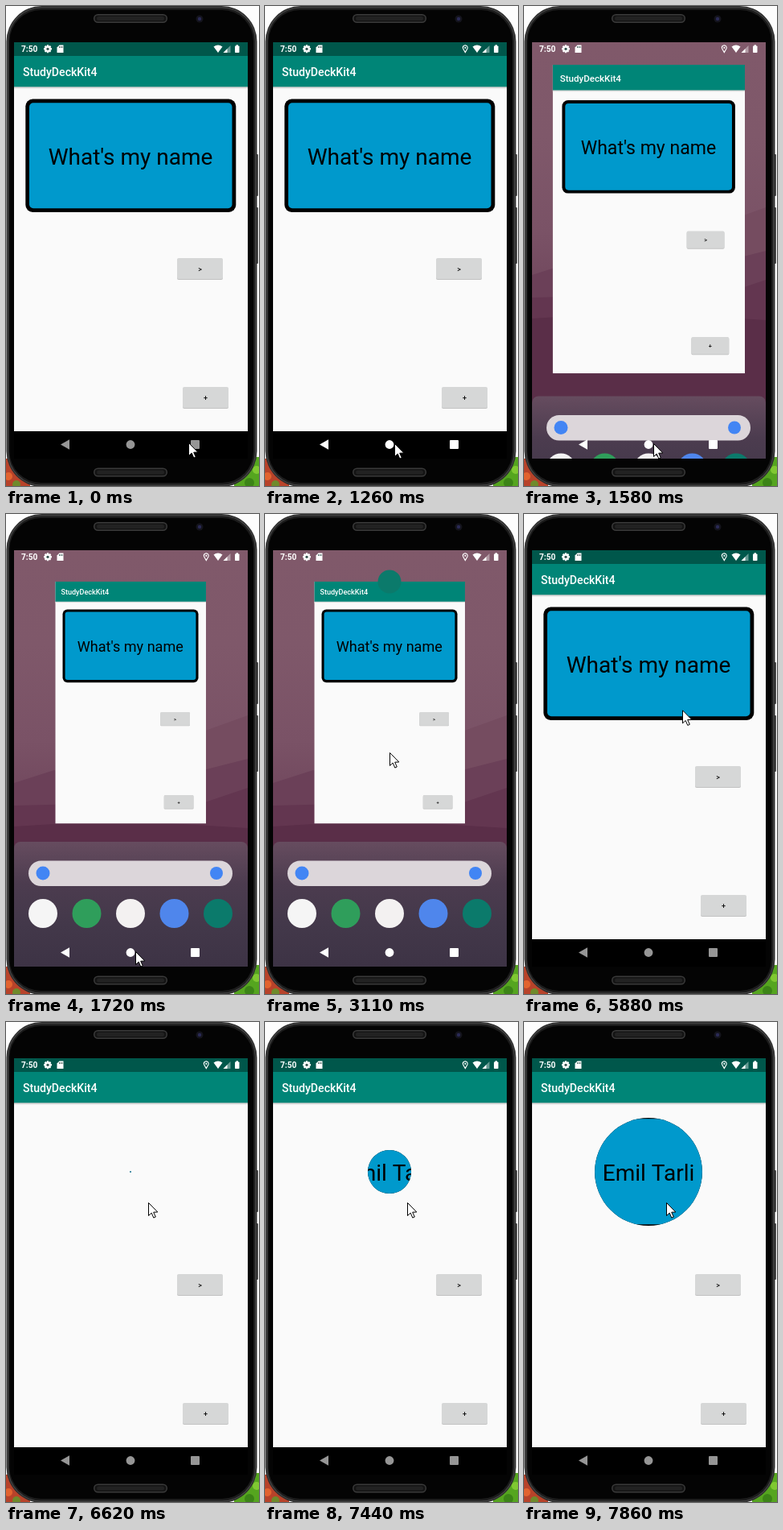
Recreate the animation shown at these times as an HTML page with a canvas. Size 315x596 px, loop 7990 ms.

```html
<!DOCTYPE html>
<html lang="en">
<head>
<meta charset="utf-8">
<title>Flash card demo</title>
<style>
  html, body { margin: 0; width: 100%; height: 100%; overflow: hidden; background: #fdfdfd; }
  canvas { display: block; width: 315px; height: 596px; }
</style>
</head>
<body>
<canvas id="stage" width="315" height="596"></canvas>
<script>
const ctx = document.getElementById('stage').getContext('2d');
const LOOP = 7990;
const TITLE = 'StudyDeckKit4', QUESTION = "What's my name", ANSWER = 'Emil Tarli';
const BLUE = '#0099cc', PAPER = '#fafafa', TEAL = '#008577';

const lerp = (a, b, p) => a + (b - a) * p;
const clamp = v => Math.max(0, Math.min(1, v));

// Number of steps taken at time t when n steps fall evenly from a to b.
function stepsDone(t, a, b, n) {
  if (t < a) return 0;
  return Math.min(n, 1 + Math.floor((t - a) / (b - a) * (n - 1) + 1e-6));
}

function box(x, y, w, h, r, fill) {
  ctx.beginPath();
  ctx.roundRect(x, y, w, h, r);
  ctx.fillStyle = fill;
  ctx.fill();
}

function disc(x, y, r, fill) {
  ctx.beginPath();
  ctx.arc(x, y, r, 0, Math.PI * 2);
  ctx.fillStyle = fill;
  ctx.fill();
}

function poly(fill, ...pts) {
  ctx.beginPath();
  for (let i = 0; i < pts.length; i += 2) ctx.lineTo(pts[i], pts[i + 1]);
  ctx.closePath();
  ctx.fillStyle = fill;
  ctx.fill();
}

function label(str, x, y, size, fill, weight = 400, align = 'left') {
  ctx.font = `${weight} ${size}px Roboto, sans-serif`;
  ctx.textAlign = align;
  ctx.fillStyle = fill;
  ctx.fillText(str, x, y);
}

function fade(y0, y1, ...colors) {
  const g = ctx.createLinearGradient(0, y0, 0, y1);
  colors.forEach((c, i) => g.addColorStop(i / (colors.length - 1), c));
  return g;
}

function drawPhone() {
  ctx.fillStyle = '#fdfdfd';
  ctx.fillRect(0, 0, 315, 596);
  // Desktop picture behind the lower corners
  box(0, 562, 30, 34, 0, '#b8432a');
  disc(3, 584, 5, '#e2632f');
  disc(13, 594, 5, '#6f8a2b');
  box(284, 560, 31, 36, 0, '#55a51f');
  disc(312, 576, 5, '#80c832');
  disc(303, 592, 6, '#3c8417');

  box(310, 184, 4, 52, 1, '#4a4a4a');
  box(310, 250, 4, 70, 1, '#4a4a4a');
  box(0.5, 0, 312, 597, 44, '#2c2c2c');
  box(2, 1.5, 309, 594, 42, '#484848');
  box(3, 2.5, 307, 592, 41, '#1c1c1c');
  box(4.5, 5, 303.5, 587, 39, '#040404');
  for (const y of [10, 573.5]) {
    box(109, y, 92, 11, 5.5, '#3a3a3a');
    box(110.5, y + 1.5, 89, 8, 4, '#141414');
    box(113, y + 3, 84, 5, 2.5, '#222');
  }
  disc(241, 16, 4.5, '#14141c');
  disc(241, 16, 2.2, '#2a2a55');
}

function drawStatus(pin) {
  label('7:50', 19, 57, 10.2, '#fff', 600);
  for (let i = 0; i < 4; i++) {
    ctx.save();
    ctx.translate(52, 53.3);
    ctx.rotate(i * Math.PI / 4);
    box(-1.2, -5, 2.4, 10, 0.5, '#fff');
    ctx.restore();
  }
  disc(52, 53.3, 3.8, '#fff');
  disc(52, 53.3, 1.6, '#35534f');
  poly('#fff', 66.5, 48.5, 71.5, 48.5, 71.5, 58, 63.5, 58, 63.5, 51.5);
  for (const x of [66, 67.8, 69.6]) box(x, 50, 0.9, 2, 0, '#35534f');
  if (pin) {
    ctx.beginPath();
    ctx.arc(249.3, 51.8, 2.9, Math.PI * 0.9, Math.PI * 2.1);
    ctx.lineTo(249.3, 57.6);
    ctx.closePath();
    ctx.strokeStyle = '#fff';
    ctx.lineWidth = 1.1;
    ctx.stroke();
    disc(249.3, 51.8, 1.1, '#fff');
  }
  ctx.beginPath();
  ctx.moveTo(264, 58);
  ctx.lineTo(258.5, 50.5);
  ctx.quadraticCurveTo(264, 46.6, 269.5, 50.5);
  ctx.fillStyle = '#fff';
  ctx.fill();
  poly('rgba(255,255,255,.4)', 270.5, 58, 279.5, 58, 279.5, 49);
  poly('#fff', 270.5, 58, 275.5, 58, 275.5, 53);
  box(285, 49.5, 5.5, 8.5, 0.8, '#fff');
  box(286.5, 48.3, 2.5, 2, 0, '#fff');
}

function drawCard(text) {
  box(24.3, 115.5, 262, 140.5, 9, '#000');
  box(29, 120.3, 252.5, 131, 5, BLUE);
  label(text, 155, 197, 28, '#000', 400, 'center');
}

function drawButton(x, y, sign) {
  box(x, y + 1, 57, 26, 2, '#c2c2c2');
  box(x, y, 57, 26, 2, '#d6d7d7');
  label(sign, x + 28.5, y + 16.5, 9, '#111', 500, 'center');
}

// App content below the status bar, placed by its top left corner.
function drawApp(x, y, scale, radius) {
  ctx.save();
  ctx.translate(x, y);
  ctx.scale(scale, scale);
  ctx.translate(-10, -62);
  ctx.beginPath();
  ctx.rect(10, 62, 291, 466);
  ctx.clip();
  box(10, 62, 291, 466, 0, PAPER);
  box(10, 100, 291, 3, 0, fade(100, 103, '#b8b8b8', PAPER));
  box(10, 62, 291, 38.3, 0, TEAL);
  label(TITLE, 21, 87, 14.1, '#fff', 500);
  if (radius === undefined) {
    drawCard(QUESTION);
  } else {
    ctx.save();
    ctx.beginPath();
    ctx.arc(155, 186, radius, 0, Math.PI * 2);
    ctx.clip();
    drawCard(ANSWER);
    ctx.restore();
  }
  drawButton(213, 313, '>');
  drawButton(220, 473, '+');
  ctx.restore();
}

function drawHome(p, showIcon) {
  ctx.save();
  ctx.beginPath();
  ctx.rect(10, 45, 291, 517);
  ctx.clip();
  box(10, 45, 291, 517, 0, fade(45, 400, '#80596a', '#7f586a', '#7a5266', '#6b4158'));
  poly('#754c60', 170, 312, 240, 272, 301, 250, 301, 420, 170, 420);
  poly('#6b4058', 10, 334, 60, 318, 150, 342, 301, 304, 301, 430, 10, 430);
  poly('#633650', 10, 362, 90, 360, 200, 374, 301, 340, 301, 562, 10, 562);
  poly('#5a2e48', 10, 388, 140, 380, 301, 390, 301, 562, 10, 562);

  drawApp(lerp(10, 61.3, p), lerp(62, 84, p), lerp(1, 0.645, p));
  if (showIcon) disc(155, 84, 14.5, '#0b7a6b');

  ctx.translate(0, (1 - p) * 155);
  box(10, 407, 291, 170, 8, fade(407, 562, '#664c5f', '#4c3c4f', '#43384a', '#3d3345'));
  box(28, 430.5, 254, 31.5, 15.7, '#dcd6da');
  disc(46, 446, 8.5, '#4285f4');
  disc(262, 446, 8, '#4285f4');
  ['#f5f5f5', '#2f9e5b', '#f3f1f1', '#4f86ec', '#0b7a6b']
    .forEach((c, i) => disc(46 + i * 54.5, 496, 18, c));
  ctx.restore();
}

function drawNav(level, ripple) {
  if (ripple > 0) box(198, 528, 74, 34, 17, `rgba(255,255,255,${0.14 * ripple})`);
  const v = Math.round(lerp(150, 255, level));
  const c = `rgb(${v},${v},${v})`;
  poly(c, 68, 544.5, 79, 538.3, 79, 550.7);
  disc(155, 544.5, 5.4, c);
  box(230, 539, 11, 11, 1, c);
}

function drawCursor([x, y]) {
  ctx.save();
  ctx.translate(x + 0.5, y + 0.5);
  poly('#fff', 0, 0, 0, 16, 3.7, 12.6, 6.3, 18.6, 8.8, 17.5, 6.2, 11.7, 11.3, 11.5);
  ctx.strokeStyle = '#000';
  ctx.lineWidth = 1;
  ctx.stroke();
  ctx.restore();
}

function cursorAt(t) {
  const home = [161, 543];
  const glide = (a, b, p) => [lerp(a[0], b[0], p), lerp(a[1], b[1], p)];
  if (t < 2560) return glide([227, 542], home, stepsDone(t, 840, 1260, 4) / 4);
  if (t < 4650) {
    const p = stepsDone(t, 2560, 3110, 5) / 5, bend = [225, 400];
    return glide(glide(home, bend, p), glide(bend, [155, 296], p), p);
  }
  if (t < 5730) return glide([185, 300], [207, 253], (stepsDone(t, 4650, 5610, 8) - 1) / 7);
  return glide([207, 253], [177, 224], stepsDone(t, 5730, 6040, 3) / 3);
}

// Three second circular reveal with ease in and out, sampled in even ticks.
function revealRadius(t) {
  const tick = 1240 / 9;
  const elapsed = 140 + Math.floor((t - 6620) / tick + 1e-6) * tick;
  return 153 * (1 - Math.cos(Math.PI * elapsed / 3000)) / 2;
}

function draw(t) {
  drawPhone();
  if (t >= 1580 && t < 4650) {
    drawHome(t < 1720 ? 0.5 : 1, t >= 1880);
  } else {
    box(10, 45, 291, 517, 0, '#000');
    box(10, 45, 291, 17.5, 0, '#00574b');
    drawApp(10, 62, 1, t >= 6620 ? revealRadius(t) : undefined);
  }
  drawStatus(t >= 840);
  const wake = stepsDone(t, 130, 430, 3) / 3;
  const dim = clamp((stepsDone(t, 4650, 5610, 8) - 4) / 4);
  drawNav(wake - dim, wake - stepsDone(t, 840, 1260, 4) / 4);
  drawCursor(cursorAt(t));
}

const start = performance.now();
function loop() {
  draw((performance.now() - start) % LOOP);
  requestAnimationFrame(loop);
}
loop();
</script>
</body>
</html>
```
